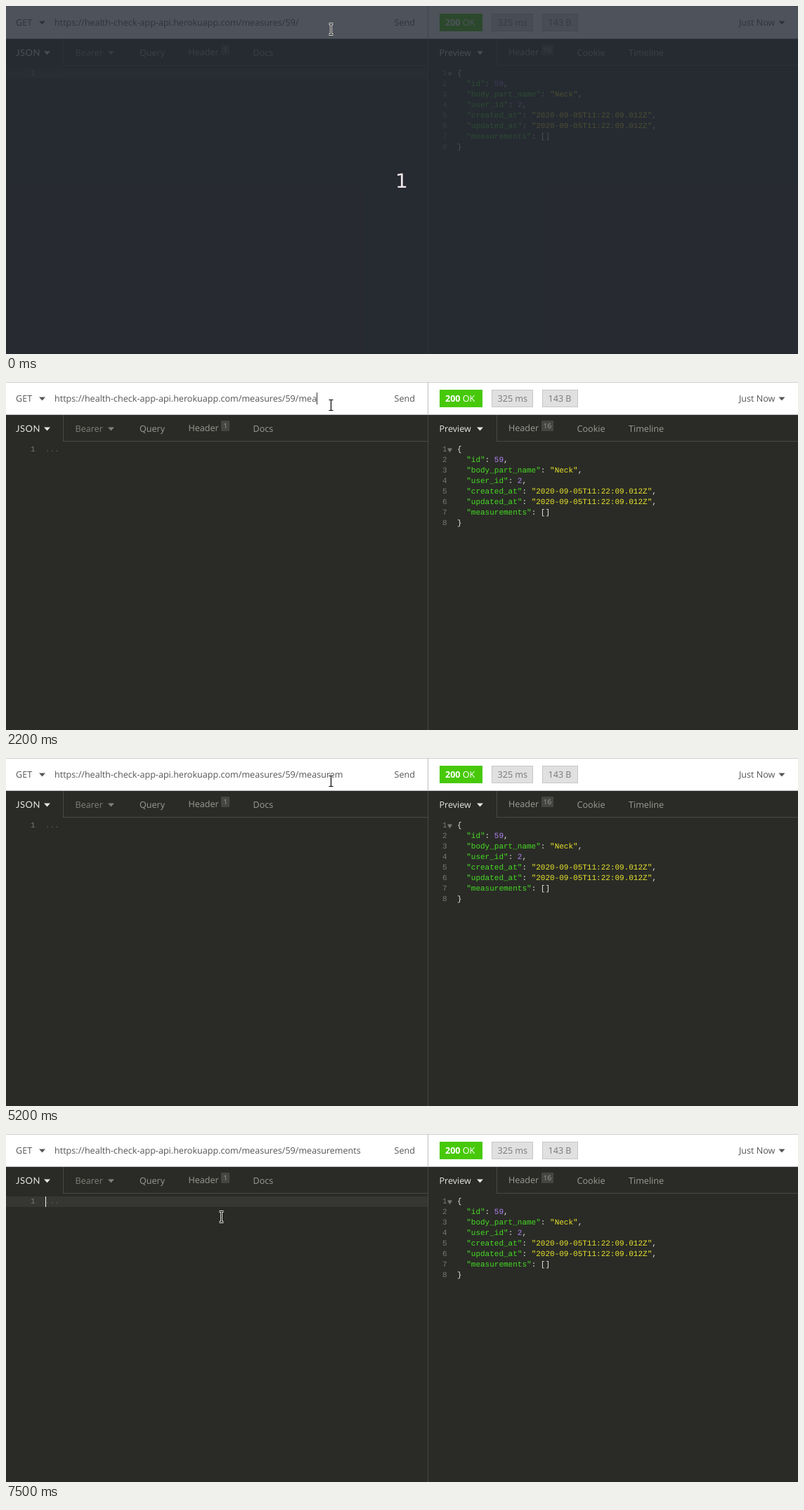
Write an HTML page that moves like this. It is 1127x496 px and loops after 8000 ms.

```html
<!DOCTYPE html>
<html lang="en">
<head>
<meta charset="utf-8">
<title>REST client</title>
<style>
  html, body { margin: 0; width: 100%; height: 100%; overflow: hidden; background: #2a2b26; }
  svg { display: block; width: 1127px; height: 496px; }
  text { font: 12.58px "Open Sans", sans-serif; text-rendering: geometricPrecision; white-space: pre; }
  .code text { font: 11px "Liberation Mono", monospace; }
  .code .num { fill: #777873; text-anchor: end; }
  .key { fill: #45dc24; }
  .str { fill: #e8e42c; }
  .val { fill: #b184f5; }
  .dark { fill: #555; }
  .on { fill: #e6e6e2; }
  .off { fill: #9a9b96; }
  .dim { fill: #80817c; }
  .line { fill: #494a46; }
  text.lato { font: 13px Lato, sans-serif; letter-spacing: .5px; }
  text.small { font-size: 10px; text-anchor: middle; }
  text.count { font: 28px "DejaVu Sans", sans-serif; text-anchor: middle; }
</style>
</head>
<body>
<svg id="stage" viewBox="0 0 1127 496"></svg>
<script>
const LOOP = 8000;
const URL_X = 69;
const BASE_URL = 'https://health-check-app-api.herokuapp.com/measures/59/';

const rect = (x, y, w, h, attrs) => `<rect x="${x}" y="${y}" width="${w}" height="${h}" ${attrs}/>`;
const label = (x, y, text, cls, attrs = '') => `<text x="${x}" y="${y}" class="${cls}" ${attrs}>${text}</text>`;
const arrow = (x, y, cls) => `<path d="M${x} ${y}h9l-4.5 5z" class="${cls}"/>`;
const badge = (x, w, text) =>
  rect(x + .5, 11.5, w - 1, 24, 'fill="#e0e0e0" stroke="#c6c6c6"') + label(x + 8.5, 28, text, '', 'fill="#777"');
const counter = (x, w, text) =>
  rect(x, 55, w, 15, 'rx="1" fill="#454641"') + label(x + w / 2, 66, text, 'off small');

const span = (cls, text) => `<tspan class="${cls}">${text}</tspan>`;
const field = (key, cls, value, end = ',') => `  ${span('key', `"${key}"`)}: ${span(cls, value)}${end}`;
const stamp = '"2020-09-05T11:22:09.012Z"';
const response = [
  '{',
  field('id', 'val', '59'),
  field('body_part_name', 'str', '"Neck"'),
  field('user_id', 'val', '2'),
  field('created_at', 'str', stamp),
  field('updated_at', 'str', stamp),
  field('measurements', 'on', '[]', ''),
  '}'
].map((text, i) => label(627.5, 99 + 15 * i, i + 1, 'num') + label(642, 99 + 15 * i, text, 'on')).join('');

const topBar =
  rect(0, 0, 1127, 47, 'fill="#fff"') +
  rect(0, 0, 1127, 1, 'fill="#d0d0d0"') +
  rect(0, 46, 1127, 1, 'fill="#c4c4c4"') +
  rect(600, 1, 1, 46, 'fill="#bdbdbd"') +
  label(14, 28, 'GET', 'dark') + arrow(47, 21.5, 'dark') +
  label(URL_X, 28, BASE_URL, 'dark', 'id="url"') +
  label(552.5, 28, 'Send', 'dark') +
  rect(617, 11, 61, 25, 'fill="#47c90a"') +
  label(625, 28, '<tspan font-weight="700">200</tspan> OK', '', 'fill="#fff"') +
  badge(691, 59, '325 ms') + badge(763, 51, '143 B') +
  label(1043, 28, 'Just Now', 'dark') + arrow(1099.5, 21.5, 'dark');

const tabs =
  rect(600, 47, 1, 449, 'class="line"') +
  rect(81, 47, 1, 38, 'class="line"') + rect(81, 84, 519, 1, 'class="line"') +
  rect(698, 47, 1, 38, 'class="line"') + rect(698, 84, 429, 1, 'class="line"') +
  label(14, 71, 'JSON', 'on lato') + arrow(54, 64.5, 'on') +
  label(98.5, 71, 'Bearer', 'dim') + arrow(145, 64.5, 'dim') +
  label(190, 71, 'Query', 'off') +
  label(259.5, 70, 'Header', 'off') + counter(306, 12, '1') +
  label(351.5, 71, 'Docs', 'off') +
  label(616.5, 71, 'Preview', 'on') + arrow(670, 64.5, 'on') +
  label(715, 70, 'Header', 'off') + counter(762, 17, '16') +
  label(812.5, 71, 'Cookie', 'off') + label(886, 71, 'Timeline', 'off');

const code = `<g class="code">
  ${rect(0, 89, 600, 15, 'fill="#363732" id="activeLine"')}
  ${label(41.5, 99, '1', 'num')}
  ${label(56, 99, '...', '', 'fill="#5c5d58"')}
  ${rect(56, 89, 1, 15, 'fill="#f4f4f0" id="editorCaret"')}
  ${response}
  <path d="M628 94.5h7l-3.5 6z" fill="#777873"/>
</g>`;

const beam = 'M-3 -7.5h2.5l.5 .5l.5 -.5h2.5M0 -7v14M-3 7.5h2.5l.5 -.5l.5 .5h2.5';
const pointer = `<g id="pointer" fill="none">
  <path d="${beam}" stroke="#fff" stroke-width="3"/><path d="${beam}" stroke="#000" stroke-width="1.2"/>
</g>`;

const stage = document.getElementById('stage');
stage.innerHTML = topBar + tabs + code +
  rect(417, 15, 1, 17, 'fill="#333" id="urlCaret"') +
  `<g id="countdown">${rect(0, 0, 1127, 496, 'fill="rgb(38,42,52)" fill-opacity=".81"')}
   ${label(563, 259, '1', 'count', 'fill="#f0e6ea"')}</g>` + pointer;
const part = id => document.getElementById(id);

// [time, typed text, caret visible]
const typing = [
  [0, '', false], [600, '', true], [1200, '', false],
  [1700, 'me', true], [2200, 'mea', true], [2400, 'meas', true],
  [2700, 'measre', true], [3100, 'measr', true], [3200, 'meas', true],
  [3400, 'measur', true], [3600, 'measurem', true], [3700, 'measureme', true],
  [4000, 'measuremets', true], [4200, 'measuremets', false],
  [4400, 'measureme', true], [4700, 'measurem', true], [5200, 'measurem', false],
  [5400, 'measureme', true], [5600, 'measurement', true], [5800, 'measurements', true],
  [6300, 'measurements', false], [6900, 'measurements', true], [7500, 'measurements', false]
];
// [time, x, y]
const pointerPath = [
  [0, 463, 33], [6400, 469, 42], [6600, 425, 70], [6700, 370, 94], [6900, 312, 116], [7000, 307, 118]
];
const latest = (steps, t) => steps.findLast(step => step[0] <= t);
const show = (id, visible) => part(id).setAttribute('visibility', visible ? 'visible' : 'hidden');

function draw(t) {
  const [, typed, caretOn] = latest(typing, t);
  const [, x, y] = latest(pointerPath, t);
  const editing = t < 600 || t >= 7500;
  const url = part('url');
  if (url.textContent !== BASE_URL + typed) url.textContent = BASE_URL + typed;
  part('urlCaret').setAttribute('x', Math.floor(URL_X + url.getComputedTextLength() + .2));
  show('urlCaret', caretOn);
  show('countdown', t < 300);
  show('activeLine', editing);
  show('editorCaret', editing && t >= 300);
  part('pointer').setAttribute('transform', `translate(${x - .5} ${y})`);
}

const start = performance.now();
function frame() {
  draw((performance.now() - start) % LOOP);
  requestAnimationFrame(frame);
}
frame();
</script>
</body>
</html>
```
